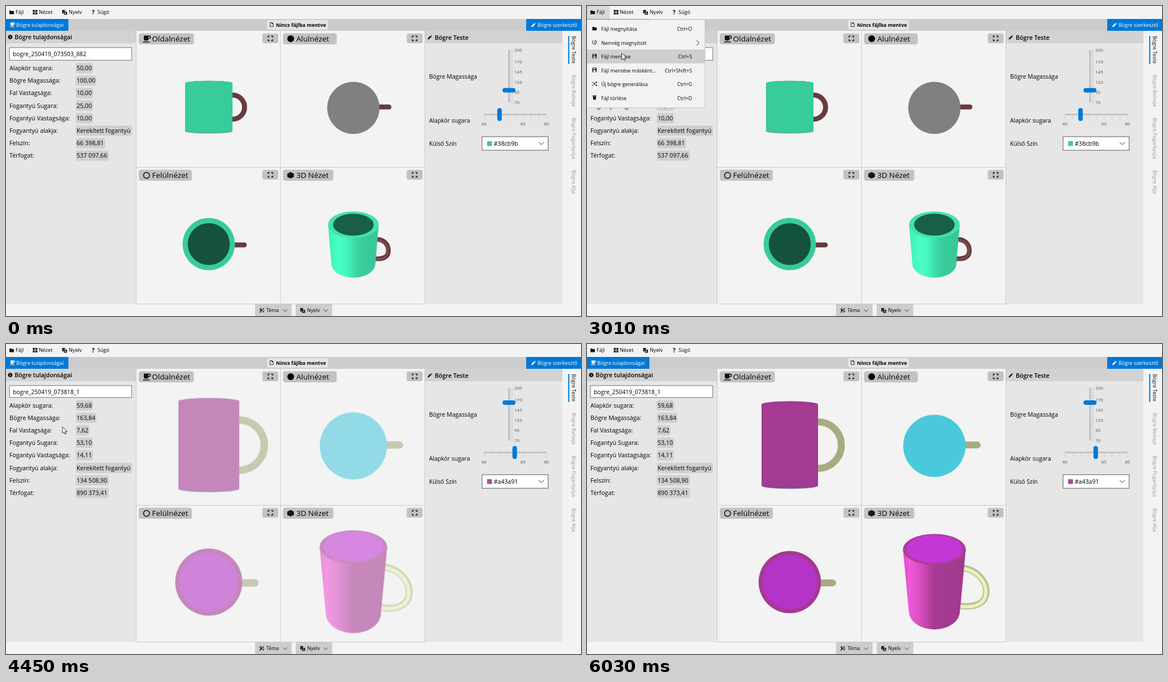
An HTML page that plays this animation: 1018x550 px, repeating every 6.28 s.

```html
<!DOCTYPE html>
<html lang="hu">
<head>
<meta charset="utf-8">
<title>Bögre tervező</title>
<style>
  html, body { margin: 0; width: 100%; height: 100%; overflow: hidden; background: #f3f3f3; }
  svg { display: block; width: 100vw; height: 100vh; font-family: "Open Sans", "Noto Sans", sans-serif; }
  text { white-space: pre; }
</style>
</head>
<body>
<svg id="stage" viewBox="0 0 1018 550"></svg>
<script>
const LOOP = 6280, MENU_OPEN = 2200, NEW_MUG = 4270, ZOOM_END = 5330;

const ICONS = {
  folder: 'M0 1h3l1 1h4v5.5H0z',
  grid: 'M0 0h3.5v3.5H0zM4.5 0H8v3.5H4.5zM0 4.5h3.5V8H0zM4.5 4.5H8V8H4.5z',
  lang: 'M0 0h5v2.5H2.5V6H0zM3 3h5.5v5.5H3zM4.2 7.6h.8l.7-2 .7 2h.8L6 4h-.6z',
  cup: 'M1 0h6.3a2 2 0 0 1 0 4H6.4a2 2 0 0 1-2 2H3A2 2 0 0 1 1 4zM6.4 1v2h.8a1 1 0 0 0 0-2zM0 7h8v1H0z',
  info: 'M4 0a4 4 0 1 0 .01 0zM3.5 1.5h1v1h-1zM3.5 3.2h1v3h-1z',
  pencil: 'M0 8l.6-2.4L5 1.2 6.8 3 2.4 7.4zM5.6.6L6.2 0 8 1.8l-.6.6z',
  file: 'M1 0h4l2.5 2.5V8H1zM1.8.8v6.4h4.9V3H4.4V.8z',
  disk: 'M0 0h7l1 1v7H0zM1.5.8v2h4v-2zM1.5 4.5v3h5v-3z',
  clock: 'M4 0a4 4 0 1 1-4 4h1a3 3 0 1 0 3-3zM3.6 2h.8v2l1.5 1-.5.6-1.8-1.2zM-.4 1.2H2L.4 4z',
  trash: 'M1 2h6l-.6 6H1.6zM0 .6h2.5L3 0h2l.5.6H8v.9H0z',
  cube: 'M4 0l4 2v4L4 8 0 6V2zM1 2.5l2.7 1.4v.3L.9 2.8z'
};
const SHUFFLE = 'M0 1.5h1.5l4.5 5h2M0 6.5h1.5l4.5-5h2M6.6 0L8 1.5 6.6 3M6.6 5L8 6.5 6.6 8';
const CORNERS = 'M0 2.5V0h2.5M5.5 0H8v2.5M8 5.5V8H5.5M2.5 8H0V5.5';

const rect = (x, y, w, h, fill, extra = '') =>
  `<rect x="${x}" y="${y}" width="${w}" height="${h}" fill="${fill}" ${extra}/>`;
const pill = (x, y, w, h, fill, r = 3) => rect(x, y, w, h, fill, `rx="${r}"`);
const path = (d, fill, extra = '') => `<path d="${d}" fill="${fill}" ${extra}/>`;
const line = (d, color, width = 1, extra = '') => path(d, 'none', `stroke="${color}" stroke-width="${width}" ${extra}`);
const ellipse = (x, y, rx, ry, fill, extra = '') =>
  `<ellipse cx="${x}" cy="${y}" rx="${rx}" ry="${ry}" fill="${fill}" ${extra}/>`;
const group = (id, content) => `<g id="${id}">${content}</g>`;
// Text placed by its vertical middle
const label = (x, mid, size, text, extra = '') =>
  `<text x="${x}" y="${mid + size * .36}" font-size="${size}" ${extra}>${text}</text>`;
const icon = (name, x, y, scale = 1, color = '#111') =>
  path(ICONS[name], color, `fill-rule="evenodd" transform="translate(${x} ${y}) scale(${scale})"`);
const stroked = (d, x, y, width = 1) => line(d, '#111', width, `transform="translate(${x} ${y})"`);
const BOLD = 'font-weight="600"', WHITE = 'fill="#fff"', MIDDLE = 'text-anchor="middle"';

function viewPane(x, y, width, title, symbol) {
  return pill(x, y, width, 19.5, '#c2c2c2', 4) + symbol + label(x + 23.5, y + 9.7, 13.5, title) +
    pill(x + 219, y + .3, 28, 17.2, '#c2c2c2') + stroked(CORNERS, x + 229, y + 5, 1.4);
}

function chrome() {
  let s = rect(0, 0, 1018, 550, '#f3f3f3') + rect(0, 0, 40, 23, '#d9d9d9', 'id="fileHover"') +
    icon('folder', 6, 7) + icon('grid', 47.5, 7) + icon('lang', 99.5, 7) +
    label(152, 11, 10, '?', 'font-weight="700"');
  [[17, 'Fájl'], [58, 'Nézet'], [111, 'Nyelv'], [162, 'Súgó']].forEach(([x, text]) => s += label(x, 11.2, 9.1, text));

  s += rect(0, 23, 1018, 21, '#cccccc') + rect(0, 23, 110.5, 21, '#0078d7', 'id="tab"') +
    icon('cup', 7, 29.3, 1, '#fff') + label(18, 33.5, 9.1, 'Bögre tulajdonságai', WHITE) +
    pill(462, 25, 108, 17, '#e4e4e4') + icon('file', 466, 29) +
    label(478, 33.5, 8.9, 'Nincs fájlba mentve', 'font-weight="700"') +
    rect(921, 23, 97, 21, '#0078d7') + icon('pencil', 930, 29.5, 1, '#fff') +
    label(941, 33.5, 8.95, 'Bögre szerkesztő', WHITE);

  s += rect(0, 44, 230, 485, '#e6e6e6') + rect(0, 44, 230, 22, '#d2d2d2') +
    icon('info', 3.5, 51) + label(15.3, 55, 10.6, 'Bögre tulajdonságai', BOLD);

  s += line('M230.5 44V529M485.8 44V529M741.5 44V529M230 286.3H742M230 528.7H742', '#c9c9c9') +
    viewPane(235, 48.5, 97.5, 'Oldalnézet', icon('cup', 242.5, 52.5, 1.5)) +
    viewPane(490.5, 48.5, 95, 'Alulnézet', ellipse(504, 58, 6, 6, '#000')) +
    viewPane(235, 290.5, 94, 'Felülnézet', ellipse(248.8, 300.5, 5.3, 5.3, 'none', 'stroke="#000" stroke-width="1.4"')) +
    viewPane(490.5, 290.5, 89, '3D Nézet', icon('cube', 498, 294.5, 1.45));

  s += rect(742, 44, 243, 485, '#e6e6e6') + rect(742, 44, 243, 22, '#d2d2d2') +
    icon('pencil', 746.5, 51.5) + label(759, 55.8, 10.7, 'Bögre Teste', BOLD) +
    label(749, 125, 10.4, 'Bögre Magassága') + label(749, 203, 10.4, 'Alapkör sugara') +
    label(749, 244.3, 10.4, 'Külső Szín');
  s += rect(889, 78, 3.5, 93, '#c4c4c4') + rect(846, 191, 111, 3, '#c4c4c4');
  for (let v = 70; v <= 200; v += 5) s += rect(893.5, 171 - (v - 70) * .715, 4.5, .7, '#bbb');
  for (let v = 40; v <= 80; v += 5) s += rect(846 + (v - 40) * 2.775, 195.5, .8, 5, '#bbb');
  [200, 170, 145, 120, 95, 70].forEach(v => s += label(900, 171 - (v - 70) * .715, 8, v, 'fill="#555"'));
  [40, 65, 80].forEach(v => s += label(846 + (v - 40) * 2.775, 209, 8, v, MIDDLE + ' fill="#555"'));
  s += rect(842.8, 231.8, 117, 24.2, '#fff', 'stroke="#8c8c8c" stroke-width="1.5"') +
    line('M943 241.5l4.8 4.5 4.8-4.5', '#333');

  s += rect(995.3, 53, 2, 50, '#0078d7');
  [[53, 'Teste', '#111'], [122, 'Belseje', '#999'], [198, 'Fogantyúja', '#999'], [291, 'Alja', '#999']].forEach(([y, part, color]) =>
    s += `<text transform="translate(1002 ${y}) rotate(90)" font-size="9" fill="${color}">Bögre ${part}</text>`);

  [[441, 'Téma'], [513, 'Nyelv']].forEach(([x, text], i) =>
    s += rect(x, 529, 64.5, 21, '#cccccc') + label(x + 20, 540, 8.8, text) +
      (i ? icon('lang', x + 8, 536) : stroked('M0 8L7.5 .5M0 3L3 0M1 5L3.5 2.5M5 7.5L8 4.5', x + 8, 536, 1.3)) +
      line(`M${x + 49.5} 538.5l3.7 3.7 3.7-3.7`, '#333'));
  return s;
}

const ROWS = ['Alapkör sugara', 'Bögre Magassága', 'Fal Vastagsága', 'Fogantyú Sugara',
  'Fogantyú Vastagsága', 'Fogyantyú alakja', 'Felszín', 'Térfogat'];

function details(m) {
  let s = rect(6.2, 73.7, 216.3, 22.6 - m.lift, '#fff', 'class="nameBox" stroke="#999" stroke-width="1.5"') +
    label(12, 85.2, 10.3, m.name);
  m.values.forEach((value, i) => {
    const mid = 110.2 - m.lift + i * 22.2;
    s += label(6, mid, 10.7, ROWS[i] + ':') + pill(123.5, mid - 9, m.widths[i], 18, '#cfcfcf', 3.5) +
      label(125, mid, 10.7, value);
  });
  return s + pill(879, 171 - (m.height - 70) * .715 - 4, 23, 8, '#0078d7', 4) +
    pill(846 + (m.radius - 40) * 2.775 - 4, 181, 8, 23, '#0078d7', 4) +
    rect(851.8, 239.8, 8.6, 8.6, m.swatch) + label(863.5, 244.3, 10.6, m.outer);
}

// Four views of one mug, each drawn around the centre it zooms about
function mugViews(m) {
  const view = (x, y, content) => `<g class="view" data-x="${x}" data-y="${y}">${content}</g>`;
  const { half, tall, bulge, ring, tube, disc, hole, reach, rim, inner, foot } = m;
  const rod = y => line(`M0 ${y}H${reach - tube / 2}`, m.handle, tube, 'stroke-linecap="round"');
  const silhouette = shift =>
    `M${-half} ${-tall}A${half} ${bulge} 0 0 1 ${half} ${-tall}V${tall + shift}A${half} ${bulge} 0 0 1 ${-half} ${tall + shift}Z`;
  const gradient = `<linearGradient id="${m.id}Shade">` +
    m.shade.map(([at, color]) => `<stop offset="${at}" stop-color="${color}"/>`).join('') + '</linearGradient>';
  return gradient +
    view(359, 179.4, ellipse(half, 0, ring, ring, 'none', `stroke="${m.handle}" stroke-width="${tube}"`) +
      path(silhouette(0), m.bottom) + path(silhouette(-.7), m.outer)) +
    view(615, 180.7, rod(-1.5) + ellipse(0, 0, disc, disc, m.bottom)) +
    view(359, 422.4, rod(1.4) + ellipse(0, 0, disc, disc, m.outer) + ellipse(0, 0, hole, hole, m.inside)) +
    view(615, 422, line(m.grip, m.gripDark, m.gripWidth) +
      line(m.grip, m.gripLight, m.gripWidth * .5, 'transform="translate(-.8 .8)"') +
      path(`M${-rim[1]} ${rim[0]}L${-foot[1]} ${foot[0]}A${foot[1]} ${foot[2]} 0 0 0 ${foot[1]} ${foot[0]}L${rim[1]} ${rim[0]}Z`, `url(#${m.id}Shade)`) +
      ellipse(0, ...rim, m.rimColor) + ellipse(0, ...inner, m.insideLit));
}

const plainMug = {
  id: 'plain', lift: 0, name: 'bogre_250419_073503_882', radius: 50, height: 100,
  values: ['50,00', '100,00', '10,00', '25,00', '10,00', 'Kerekített fogantyú', '66 398,81', '537 097,66'],
  widths: [30.5, 36.5, 30.5, 30.5, 30.5, 99.5, 52, 58.5],
  outer: '#38cb9b', swatch: '#3cc99c', inside: '#14523c', insideLit: '#175f45', bottom: '#808080',
  handle: '#693a3d', gripDark: '#63363a', gripLight: '#7b4a4d', rimColor: '#40e2ae',
  shade: [[0, '#41eeb5'], [.2, '#48ffc6'], [.35, '#45f8bf'], [.58, '#3bd3a2'], [.7, '#38cb9b'], [1, '#38c698']],
  half: 42, tall: 42.8, bulge: 3.8, ring: 21.4, tube: 8.8, disc: 46.3, hole: 37.2, reach: 67.3,
  rim: [-34, 44.8, 23.6], inner: [-34, 36, 19.6], foot: [35, 39, 25],
  grip: 'M38-8C55-9 62 2 62 12C62 24 52 28 36 26', gripWidth: 8.2
};
const randomMug = {
  id: 'random', lift: 1.5, name: 'bogre_250419_073818_1', radius: 59.68, height: 163.84,
  values: ['59,68', '163,84', '7,62', '53,10', '14,11', 'Kerekített fogantyú', '134 508,90', '890 373,41'],
  widths: [30.5, 36.5, 24, 30.5, 30.5, 99.5, 58.5, 58.5],
  outer: '#a43a91', swatch: '#9a5590', inside: '#b533c6', insideLit: '#c337d5', bottom: '#4bc9dc',
  handle: '#a6ac80', gripDark: '#bdc394', gripLight: '#e9f1bd', rimColor: '#ab3e98',
  shade: [[0, '#df4dc5'], [.1, '#f157d8'], [.25, '#dc4fc4'], [.5, '#a73b94'], [.6, '#a43a91'], [1, '#a03a8e']],
  half: 50, tall: 72.4, bulge: 5.4, ring: 41.3, tube: 12.2, disc: 55.2, hole: 48.4, reach: 82,
  rim: [-57.5, 55.6, 27.5], inner: [-58.3, 49.3, 24.8], foot: [52, 45.3, 32.5],
  grip: 'M46-25C74-24 92-2 92 17C92 38 72 47 42 42', gripWidth: 11.5
};

const ITEM_TOP = 28.3, ITEM_HEIGHT = 24.5;
function menu() {
  const items = [['folder', 'Fájl megnyitása', 'Ctrl+O'], ['clock', 'Nemrég megnyitott', ''], ['disk', 'Fájl mentése', 'Ctrl+S'],
    ['disk', 'Fájl mentése másként...', 'Ctrl+Shift+S'], ['shuffle', 'Új bögre generálása', 'Ctrl+G'], ['trash', 'Fájl törlése', 'Ctrl+D']];
  return rect(-2, 24, 211, 156.5, '#f2f2f2', 'stroke="#c4c4c4"') +
    rect(0, 0, 209, ITEM_HEIGHT, '#cfcfcf', 'id="itemHover"') +
    items.map(([name, text, keys], i) => {
      const mid = ITEM_TOP + ITEM_HEIGHT * (i + .5);
      return (name === 'shuffle' ? stroked(SHUFFLE, 9.5, mid - 4.5) : icon(name, 9.5, mid - 4.5, .95)) +
        label(25, mid + .3, 8.9, text) + label(186, mid + .3, 8.9, keys, 'text-anchor="end"');
    }).join('') + line('M194 61l4.8 4.3-4.8 4.3', '#222');
}

const stage = document.getElementById('stage');
stage.innerHTML = chrome() +
  group('before', details(plainMug) + mugViews(plainMug)) +
  group('after', details(randomMug) + group('fresh', mugViews(randomMug))) +
  group('menu', menu()) +
  group('pointer', ellipse(1.3, 3.3, 6.3, 6.3, '#f5e52e', 'id="click" opacity=".75"') +
    path('M0 0V11.6L2.8 9l1.8 4 1.8-.8-1.8-3.8h3.8z', '#fff', 'stroke="#222" stroke-width=".9"'));

const el = id => document.getElementById(id);
const show = (id, on) => el(id).style.display = on ? '' : 'none';
const between = (v, from, to) => v >= from && v < to;
const linear = p => p, easeOut = p => 1 - (1 - p) ** 2, smooth = p => p * p * (3 - 2 * p);

// time, x, y, easing towards the point
const TRACK = [[340, 808, 478], [480, 207, 174, easeOut], [770, 207, 174], [1000, 140, 121], [1390, 57, 54],
  [1920, 17, 13.5, smooth], [2710, 17, 13.5], [3270, 97, 140, smooth], [3370, 97, 140], [3560, 100, 149, smooth],
  [3770, 100, 149], [3860, 100, 147], [LOOP, 100, 147]];

function pointerAt(t) {
  const i = Math.max(1, TRACK.findIndex(key => key[0] > t));
  const [t0, x0, y0] = TRACK[i - 1], [t1, x1, y1, ease = linear] = TRACK[i];
  const p = ease(Math.max(0, (t - t0) / (t1 - t0)));
  return [x0 + (x1 - x0) * p, y0 + (y1 - y0) * p];
}

const views = [...document.querySelectorAll('.view')];
const nameBox = document.querySelector('.nameBox');

function draw(t) {
  const [x, y] = pointerAt(t), menuOpen = between(t, MENU_OPEN, NEW_MUG), renewed = t >= NEW_MUG;
  const hovering = between(t, 770, MENU_OPEN);
  show('before', !renewed);
  show('after', renewed);
  show('menu', menuOpen);
  show('pointer', between(t, 340, 6030));
  show('click', between(t, 2110, 2330) || between(t, 4060, NEW_MUG));
  show('fileHover', menuOpen || hovering && y < 23);
  el('tab').setAttribute('fill', hovering && between(y, 23, 44) ? '#1a86db' : '#0078d7');
  nameBox.setAttribute('stroke', hovering && between(y, 73, 97) ? '#666' : '#999');
  el('pointer').setAttribute('transform', `translate(${x} ${y})`);

  const item = Math.floor((y - ITEM_TOP) / ITEM_HEIGHT);
  show('itemHover', between(item, 0, 6));
  el('itemHover').setAttribute('y', ITEM_TOP + item * ITEM_HEIGHT);
  el('itemHover').setAttribute('fill', t >= 4060 ? '#c4c4c4' : '#cfcfcf');

  const left = Math.max(0, Math.min(1, (ZOOM_END - t) / (ZOOM_END - NEW_MUG)));
  const zoom = renewed ? 1 + .097 * left ** 1.3 : 1;
  views.forEach(v => v.setAttribute('transform', `translate(${v.dataset.x} ${v.dataset.y}) scale(${zoom})`));
  // Each view fades as one layer
  el('fresh').setAttribute('opacity', Math.max(0, Math.min(1, (t - NEW_MUG) / 310)));
}

const start = performance.now();
(function tick() {
  draw((performance.now() - start) % LOOP);
  requestAnimationFrame(tick);
})();
</script>
</body>
</html>
```
